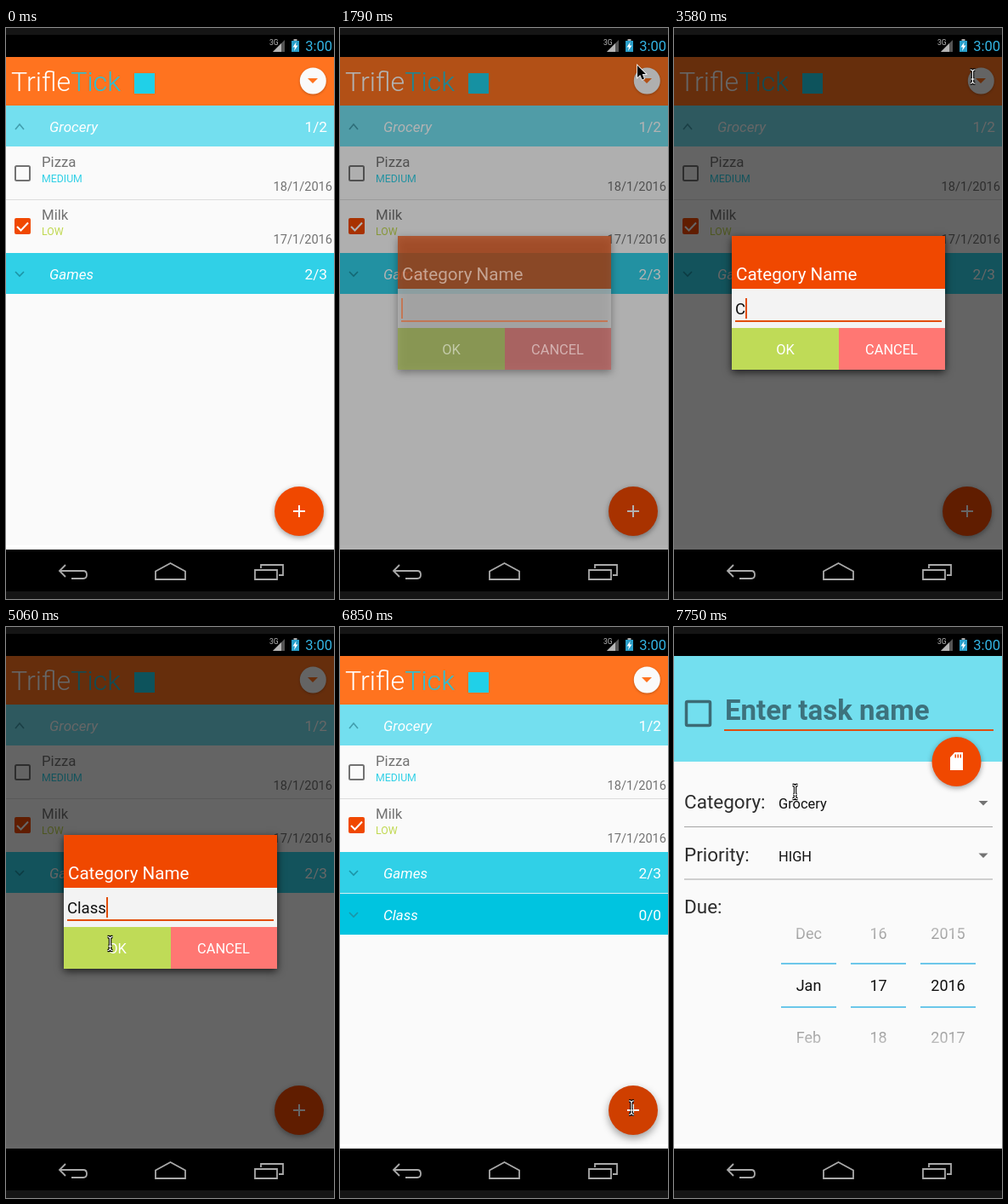
These frames come from a looping animation (386x670 px, 8 s). An HTML page with a canvas:

```html
<!DOCTYPE html>
<html lang="en">
<head>
<meta charset="utf-8">
<title>To-do list demo</title>
<style>
  html, body { margin: 0; width: 100%; height: 100%; overflow: hidden; background: #151515; }
  canvas { display: block; }
</style>
</head>
<body>
<canvas id="stage" width="386" height="670"></canvas>
<script>
const ctx = document.getElementById('stage').getContext('2d');
const LOOP = 8000;
const ORANGE = '#f04800', GREY = '#727272', SKY = '#73dfef';
const FAMILY = 'Roboto, "Noto Sans", sans-serif';

const mix = (a, b, p) => a + (b - a) * p;
const ease = p => p * p * (3 - 2 * p);

// How many of n evenly spaced ticks from start to end have passed.
function ticks(t, start, end, n) {
  if (t < start) return 0;
  return Math.min(n, 1 + Math.floor((t - start + 4) / ((end - start) / (n - 1))));
}

function rect(x, y, w, h, color) {
  ctx.fillStyle = color;
  ctx.fillRect(x, y, w, h);
}

function text(str, x, y, size, color, align = 'left', style = '') {
  ctx.font = `${style} ${size}px ${FAMILY}`;
  ctx.textAlign = align;
  ctx.fillStyle = color;
  ctx.fillText(str, x, y);
}

function trace(points, close) {
  ctx.beginPath();
  points.forEach(([x, y]) => ctx.lineTo(x, y));
  if (close) ctx.closePath();
}

function line(points, color, width, close) {
  trace(points, close);
  ctx.strokeStyle = color;
  ctx.lineWidth = width;
  ctx.stroke();
}

function shape(points, color) {
  trace(points, true);
  ctx.fillStyle = color;
  ctx.fill();
}

function disc(x, y, r, color) {
  ctx.beginPath();
  ctx.arc(x, y, r, 0, Math.PI * 2);
  ctx.fillStyle = color;
  ctx.fill();
}

function shadow(blur, dy, alpha, draw) {
  ctx.save();
  ctx.shadowColor = `rgba(0,0,0,${alpha})`;
  ctx.shadowBlur = blur;
  ctx.shadowOffsetY = dy;
  draw();
  ctx.restore();
}

function faded(alpha, draw) {
  ctx.save();
  ctx.globalAlpha = alpha;
  draw();
  ctx.restore();
}

function boxOutline(x, y, size, width, color) {
  ctx.beginPath();
  ctx.roundRect(x, y, size, size, 1.5);
  ctx.strokeStyle = color;
  ctx.lineWidth = width;
  ctx.stroke();
}

function drawDevice() {
  rect(0, 0, 386, 670, '#151515');
  rect(0, 8, 386, 26, '#000');
  rect(0, 612, 386, 49, '#000');

  text('3G', 310, 20, 8.5, '#bbb');
  shape([[314, 28], [328, 28], [328, 14]], '#555');
  shape([[314, 28], [324, 28], [324, 18]], '#b5b5b5');
  rect(338.5, 13, 4, 2, '#aaa');
  rect(336, 15, 9, 13, '#2a9fca');
  shape([[341.5, 16.5], [337.5, 22.5], [340, 22.5], [339, 27], [343.5, 20.5], [341, 20.5]], '#fff');
  text('3:00', 384, 27, 16.5, '#33b5e5', 'right');

  const c = '#aaa';
  line([[70, 630], [63, 637], [70, 644]], c, 1.8);
  ctx.beginPath();
  ctx.moveTo(63, 637);
  ctx.lineTo(91, 637);
  ctx.quadraticCurveTo(95, 637, 95, 641.5);
  ctx.quadraticCurveTo(95, 646, 91, 646);
  ctx.lineTo(77, 646);
  ctx.stroke();
  line([[193.5, 628], [211, 637.5], [211, 647], [176, 647], [176, 637.5]], c, 1.8, true);
  line([[293, 636], [319, 636], [319, 647], [293, 647]], c, 1.8, true);
  line([[300, 634], [300, 630], [326, 630], [326, 642], [321, 642]], c, 1.8);
}

function drawWordmark() {
  const font = size => `300 condensed ${size}px ${FAMILY}`;
  ctx.font = font(100);
  const size = Math.min(46, 12900 / ctx.measureText('TrifleTick').width);
  ctx.font = font(size);
  ctx.textAlign = 'left';
  const y = 63 + size * 0.355;
  ctx.fillStyle = '#fff';
  ctx.fillText('Trifle', 6, y);
  const w = ctx.measureText('Trifle').width;
  ctx.fillStyle = '#2bbfd4';
  ctx.fillText('Tick', 6 + w, y);
  rect(151, 53, 24, 24, '#20d0e8');
}

function drawGroup(y, name, count, color, open) {
  rect(0, y, 386, 48, color);
  const d = open ? -3 : 3;
  line([[11, y + 25 - d], [16, y + 25 + d - (open ? 0 : 1)], [21, y + 25 - d]],
    open ? '#429eae' : '#1c94a6', 1.6);
  text(name, 51, y + 30.5, 17, '#fff', 'left', 'italic');
  text(count, 378, y + 30.5, 17.3, '#fff', 'right');
}

function drawTask(y, name, level, color, date, done) {
  text(name, 42, y + 24, 16.8, GREY);
  text(level, 42, y + 42, 12.3, color);
  text(date, 384, y + 52, 14.6, GREY, 'right');
  if (done) {
    ctx.beginPath();
    ctx.roundRect(10, y + 22, 19, 19, 2);
    ctx.fillStyle = ORANGE;
    ctx.fill();
    line([[13, y + 32], [17.5, y + 36.5], [26, y + 27.5]], '#fff', 2);
  } else {
    boxOutline(11, y + 23, 17, 2, GREY);
  }
}

function drawFab(x, y, color, pressed) {
  shadow(pressed ? 10 : 6, pressed ? 4 : 2, 0.38, () => disc(x, y, 29, color));
}

function drawList(withClass, pressed) {
  rect(0, 34, 386, 578, '#fafafa');
  rect(0, 607, 386, 5, '#fff');
  rect(0, 34, 386, 57, '#ff731f');
  drawWordmark();
  shadow(3, 1, 0.25, () => disc(361.3, 62, 15.5, '#fafafa'));
  shape([[355, 59], [367, 59], [361, 65]], '#ff731f');

  drawGroup(91, 'Grocery', '1/2', SKY, true);
  drawTask(139, 'Pizza', 'MEDIUM', '#30d0e6', '18/1/2016', false);
  rect(0, 201, 386, 1, '#dcdcdc');
  drawTask(201, 'Milk', 'LOW', '#c0d850', '17/1/2016', true);
  drawGroup(264, 'Games', '2/3', '#30d0e7', false);
  if (withClass) {
    rect(0, 312, 386, 1, '#d5eff3');
    drawGroup(313, 'Class', '0/0', '#00c4e0', false);
  }

  drawFab(345, 567, pressed ? '#cf3f00' : ORANGE, pressed);
  rect(338, 566, 14, 2, '#fff');
  rect(344, 560, 2, 14, '#fff');
}

function drawDialog(typed, caret) {
  shadow(9, 3, 0.7, () => rect(68, 244, 251, 157, '#333'));
  rect(68, 244, 251, 62, ORANGE);
  text('Category Name', 73, 296, 20.6, '#fff');
  rect(68, 306, 251, 46, '#f3f3f3');
  rect(72, 343, 243, 2, '#e24d0a');
  text(typed, 72, 336, 18.6, '#111');
  if (caret) {
    const w = ctx.measureText(typed).width;
    rect(72 + Math.round(w), 317, 2, 24, '#e24d0a');
  }
  rect(68, 352, 126, 49, '#bfdb57');
  rect(194, 352, 125, 49, '#ff7773');
  text('OK', 131, 383, 16.4, '#fff', 'center');
  text('CANCEL', 256, 383, 16.4, '#fff', 'center');
}

function drawField(label, value, y) {
  text(label, 12, y, 22.5, '#2d2d2d');
  if (!value) return;
  text(value, 123, y, 16.4, '#111');
  shape([[358.5, y - 9], [369.5, y - 9], [364, y - 3.5]], '#737373');
  rect(12, y + 21, 363, 1, '#a5a5a5');
}

function drawPicker(x, values) {
  const fade = ctx.createLinearGradient(0, 345, 0, 497);
  fade.addColorStop(0, '#c8c8c8');
  fade.addColorStop(0.2, '#8c8c8c');
  fade.addColorStop(0.8, '#8c8c8c');
  fade.addColorStop(1, '#d0d0d0');
  values.forEach((v, i) =>
    text(v, x, 366 + i * 61, 18, i === 1 ? '#111' : fade, 'center'));
  rect(x - 32.5, 394, 65, 2, '#6cc7ea');
  rect(x - 32.5, 445, 65, 2, '#6cc7ea');
}

function drawForm() {
  rect(0, 34, 386, 578, '#fafafa');
  rect(0, 607, 386, 5, '#fff');
  rect(0, 34, 386, 124, SKY);
  boxOutline(14.5, 87.5, 28, 3.5, '#3c6b75');
  text('Enter task name', 60, 109, 33, '#3d727d', 'left', 'bold');
  rect(59, 120, 317, 2, '#e04e10');

  drawFab(332.5, 158, ORANGE, false);
  shape([[330.5, 147], [340, 147], [340, 168], [325, 168], [325, 153]], '#fff');
  for (let i = 0; i < 3; i++) rect(330.5 + i * 3, 149.5, 1.5, 4, ORANGE);

  drawField('Category:', 'Grocery', 213);
  drawField('Priority:', 'HIGH', 274.5);
  drawField('Due:', '', 336);
  drawPicker(158.5, ['Dec', 'Jan', 'Feb']);
  drawPicker(240.5, ['16', '17', '18']);
  drawPicker(322.5, ['2015', '2016', '2017']);
}

function drawArrow(x, y) {
  ctx.save();
  ctx.translate(x, y);
  const tip = [[0, 0], [0, 14], [3.2, 11], [5.6, 16.5], [8, 15.5], [5.7, 10], [10, 10]];
  line(tip, '#fff', 1.6, true);
  shape(tip, '#000');
  ctx.restore();
}

function drawBeam(x, y) {
  ctx.save();
  ctx.translate(x, y);
  for (const [color, width] of [['#000', 3.4], ['#fff', 1.2]]) {
    line([[-3, -8], [-1.5, -8], [0, -6.5], [1.5, -8], [3, -8]], color, width);
    line([[0, -7], [0, 7]], color, width);
    line([[-3, 8], [-1.5, 8], [0, 6.5], [1.5, 8], [3, 8]], color, width);
    line([[-2, 3], [2, 3]], color, width);
  }
  ctx.restore();
}

function drawPointer(t) {
  const arrive = ticks(t, 300, 1340, 8);
  if (!arrive) return;
  if (t < 1930) {
    const p = ease((arrive - 1) / 7), q = 1 - p;
    drawArrow(q * q * 370 + 2 * p * q * 279 + p * p * 350,
              q * q * 567 + 2 * p * q * 330 + p * p * 44);
    return;
  }
  let pos = [351.5, t < 2080 ? 53 : 57];
  const go = (to, start, end, n) => {
    const p = ease(ticks(t, start, end, n) / n);
    pos = [mix(pos[0], to[0], p), mix(pos[1], to[1], p)];
  };
  go([122.5, 371.5], 4320, 5060, 6);
  go([343, 564], 5810, 6850, 8);
  go([142.5, 193.5], 7000, 7750, 6);
  drawBeam(...pos);
}

function render(t) {
  drawDevice();
  ctx.save();
  ctx.beginPath();
  ctx.rect(0, 33, 386, 579);
  ctx.clip();

  if (t < 7150) drawList(t >= 5360, t >= 6850);
  if (t >= 1790 && t < 5510) {
    const alpha = t < 1930 || t >= 5360 ? 0.5 : 1;
    faded(alpha, () => rect(0, 33, 386, 579, 'rgba(0,0,0,0.6)'));
    const typed = 'Class'.slice(0, [0, 1, 2, 3, 5][ticks(t, 3580, 4020, 4)]);
    const off = (t >= 2830 && t < 3280) || (t >= 4620 && t < 5056);
    faded(alpha, () => drawDialog(typed, !off));
  }
  if (t >= 7000) {
    ctx.save();
    if (t < 7150) {
      ctx.globalAlpha = 0.6;
      ctx.translate(0, 20);
    }
    drawForm();
    ctx.restore();
  }
  drawPointer(t);
  ctx.restore();
}

const begin = performance.now();
function loop() {
  render((performance.now() - begin) % LOOP);
  requestAnimationFrame(loop);
}
loop();
</script>
</body>
</html>
```
